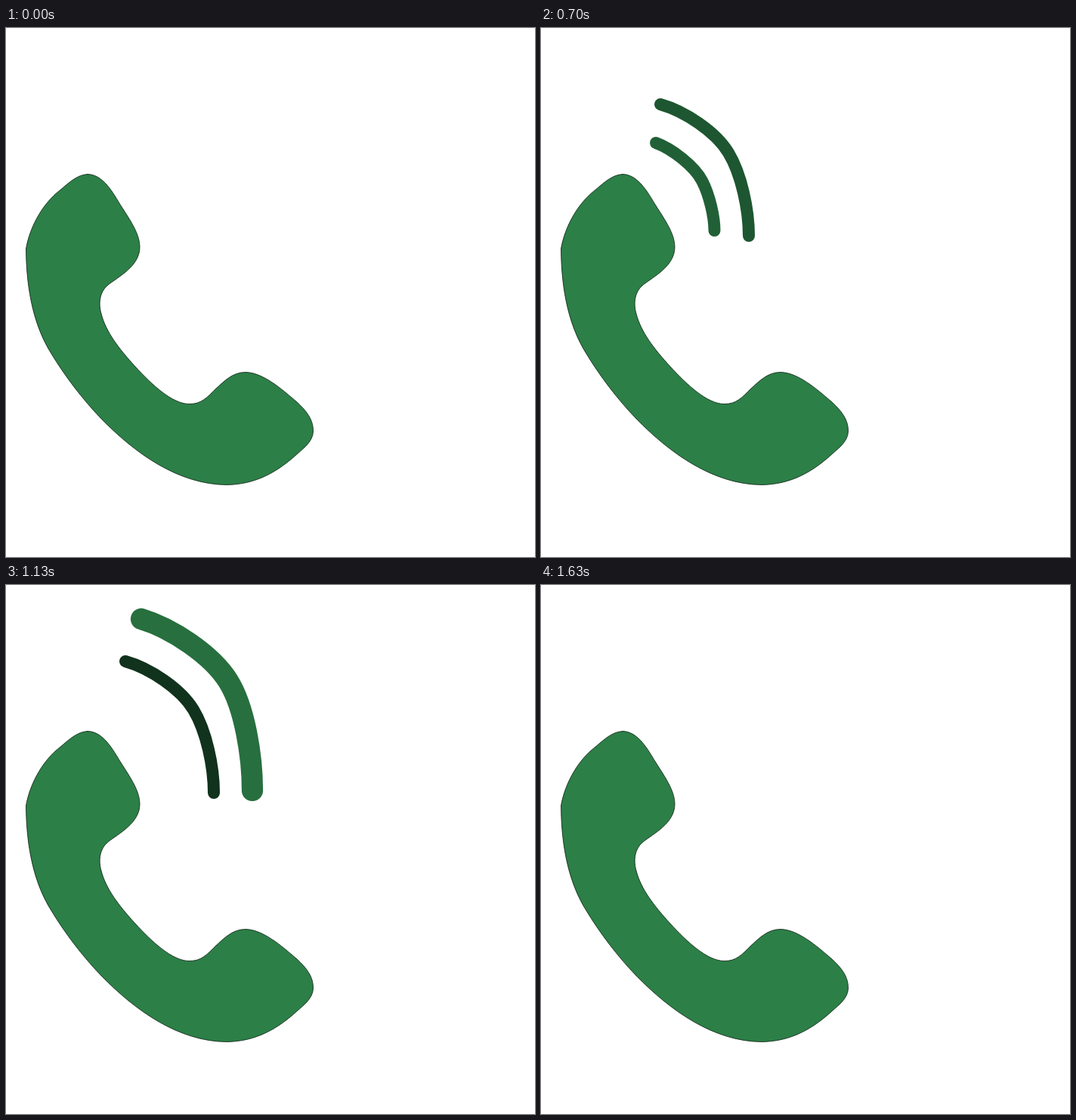
Animation, 700 px wide and 700 px high, one loop 2060 ms. Source, as an HTML page with a canvas:

```html
<!DOCTYPE html>
<html lang="en">
<head>
<meta charset="utf-8">
<title>Ringing phone</title>
<style>
html, body { margin: 0; width: 100%; height: 100%; overflow: hidden; background: #fff; }
canvas { display: block; width: 700px; height: 700px; }
</style>
</head>
<body>
<canvas id="stage" width="700" height="700"></canvas>
<script>
const ctx = document.getElementById('stage').getContext('2d');
const LOOP = 2060;
const DARK = [12, 36, 20];
const GREEN = [44, 127, 71];

const phone = new Path2D(
  'M108 193.5 C129 193.5 142 219 152 235 C164 254 177 272 177 290 ' +
  'C177 315 149 329 135 340 C124 349 122 364 126 378 ' +
  'C132 402 150 425 171 448 C194 473 220 497 242 497.5 ' +
  'C258 498 266 489 277 478 C289 467 300 455.5 317 455.5 ' +
  'C340 456 364 477 385 495 C397 506 407 518 406.5 534 ' +
  'C406 547 394 556 386 563 C360 587 331 604 292 604.5 ' +
  'C228 604 171 563 126 517 C100 490 77 459 60 431 ' +
  'C38 396 27 350 26.5 292 C32 261 50 231 71 215 C83 205 94 194 108 193.5 Z');

// Brightness keys are [ms since the wave appeared, 0 = dark .. 1 = green].
const pulse = [[0, 0], [100, 0], [200, .54], [230, .72], [300, .8], [400, .66], [500, .46], [700, 0]];
const longPulse = [[0, 0], [60, 0], [170, .35], [300, .83], [440, .77], [550, .72], [800, .45]];

const waves = [
  { start: 300, end: 1030, keys: pulse, width: 16, swell: 0,
    path: new Path2D('M152 152 C174 160 203 183 213 202 C223 221 229.5 250 229.5 268') },
  { start: 500, end: 1230, keys: pulse, width: 16, swell: 0,
    path: new Path2D('M158 101 C190 110 231 137 248 165 C265 193 275 240 275 275') },
  { start: 830, end: 1630, keys: longPulse, width: 24.5, swell: 4.5,
    path: new Path2D('M179 45 C219 57 272 92 294 127 C316 162 326 227 326 272') }
];

function valueAt(keys, t) {
  for (let i = 1; i < keys.length; i++) {
    const [t0, v0] = keys[i - 1], [t1, v1] = keys[i];
    if (t <= t1) return v0 + (v1 - v0) * (t - t0) / (t1 - t0);
  }
  return keys[keys.length - 1][1];
}

function mix(k) {
  return `rgb(${DARK.map((c, i) => Math.round(c + (GREEN[i] - c) * k))})`;
}

function draw(t) {
  ctx.fillStyle = '#fff';
  ctx.fillRect(0, 0, 700, 700);
  ctx.fillStyle = mix(1);
  ctx.fill(phone);
  ctx.strokeStyle = '#0a1f10';
  ctx.lineWidth = 0.8;
  ctx.stroke(phone);

  ctx.lineCap = 'round';
  for (const w of waves) {
    if (t < w.start || t >= w.end) continue;
    const k = valueAt(w.keys, t - w.start);
    ctx.strokeStyle = mix(k);
    ctx.lineWidth = w.width + w.swell * k;
    ctx.stroke(w.path);
  }
}

function tick() {
  draw(performance.now() % LOOP);
  requestAnimationFrame(tick);
}
tick();
</script>
</body>
</html>
```
